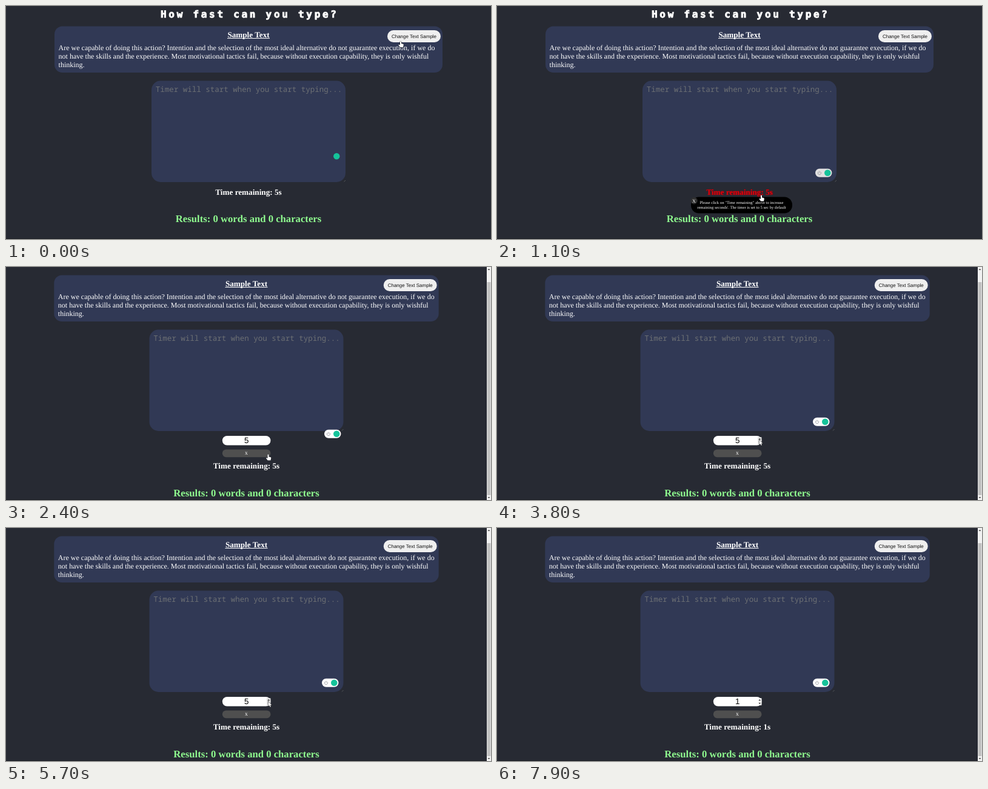
These frames come from a looping animation (800 by 385 pixels, 8000 ms). An HTML page with a canvas:

```html
<!DOCTYPE html>
<html lang="en">
<head>
<meta charset="utf-8">
<title>How fast can you type?</title>
<style>
html, body { margin: 0; width: 100%; height: 100%; overflow: hidden; background: #272a33; }
canvas { display: block; }
</style>
</head>
<body>
<canvas id="stage" width="800" height="385"></canvas>
<script>
const ctx = document.getElementById('stage').getContext('2d');
const LOOP = 8000;
const SETTINGS_AT = 2400;
const BG = '#272a33', PANEL = '#313955', MINT = '#15c39a';
const SERIF = '"Liberation Serif", "Times New Roman", serif';
const SANS = '"Liberation Sans", Arial, sans-serif';
const MONO = '"Noto Sans Mono", "DejaVu Sans Mono", monospace';
const TITLE = 'bold 16px "DejaVu Sans Mono", monospace';

const SAMPLE = [
  'Are we capable of doing this action? Intention and the selection of the most ideal alternative do not guarantee execution, if we do',
  'not have the skills and the experience. Most motivational tactics fail, because without execution capability, they is only wishful',
  'thinking.'
];
const HINT = [
  'Please click on "Time remaining" above to increase',
  "remaining seconds'. The timer is set to 5 sec by default"
];

// [time, x, y] of the pointer tip
const MOVES = [
  [0, 651, 58], [100, 651, 58], [900, 436, 312.5], [1700, 436, 312.5],
  [2000, 432.5, 309.5], [2450, 432.5, 309.5], [2800, 432.5, 285.5],
  [4600, 432.5, 285.5], [4750, 432.5, 286.5], [LOOP, 432.5, 286.5]
];
// [time, seconds]
const CLICKS = [
  [0, 5], [4100, 6], [4300, 7], [4500, 8], [4800, 7], [5100, 6],
  [5700, 5], [5800, 4], [6100, 3], [6500, 2], [7100, 1]
];

const clamp = v => Math.max(0, Math.min(1, v));
const ease = v => v * v * (3 - 2 * v);

function pointerAt(t) {
  const i = MOVES.findIndex(m => m[0] > t);
  const a = MOVES[i - 1], b = MOVES[i];
  const k = ease((t - a[0]) / (b[0] - a[0]));
  return [a[1] + (b[1] - a[1]) * k, a[2] + (b[2] - a[2]) * k];
}

function secondsAt(t) {
  return CLICKS.filter(c => c[0] <= t).pop()[1];
}

function box(x, y, w, h, r, color) {
  ctx.fillStyle = color;
  ctx.beginPath();
  ctx.roundRect(x, y, w, h, r);
  ctx.fill();
}

function disc(x, y, r, color) {
  ctx.fillStyle = color;
  ctx.beginPath();
  ctx.arc(x, y, r, 0, 7);
  ctx.fill();
}

function text(s, x, y, font, color, align = 'center') {
  ctx.font = font;
  ctx.fillStyle = color;
  ctx.textAlign = align;
  ctx.fillText(s, x, y);
}

function title(mid, y) {
  const s = 'How fast can you type?', cell = 13.35;
  ctx.strokeStyle = '#fff';
  ctx.lineWidth = 0.9;
  [...s].forEach((c, i) => {
    const x = mid + (i - (s.length - 1) / 2) * cell;
    text(c, x, y, TITLE, '#fff');
    ctx.strokeText(c, x, y);
  });
}

function samplePanel(mid, width, dy) {
  const left = mid - width / 2, right = mid + width / 2;
  box(left, 33.5 + dy, width, 76.5, 13, PANEL);
  text('Sample Text', mid, 52 + dy, 'bold 13.2px ' + SERIF, '#fff');
  ctx.fillRect(mid - 35, 53 + dy, 70, 1);
  SAMPLE.forEach((s, i) =>
    text(s, left + 6.6, 73 + dy + i * 13.8, '12px ' + SERIF, '#fff', 'left'));
  box(right - 91, 40 + dy, 88, 20, 10, '#efefef');
  text('Change Text Sample', right - 47, 52.7 + dy, '8px ' + SANS, '#111');
}

function typingArea(mid, dy) {
  const left = mid - 160;
  box(left, 123.5 + dy, 320, 167.5, 15, PANEL);
  text('Timer will start when you start typing...', left + 6.8, 142.3 + dy,
    '12.5px ' + MONO, '#6d7074', 'left');
  ctx.strokeStyle = '#777';
  ctx.lineWidth = 0.6;
  ctx.beginPath();
  ctx.moveTo(left + 317.5, 290.5 + dy);
  ctx.lineTo(left + 320, 288 + dy);
  ctx.stroke();
}

function helperPill(x, y, shade) {
  box(x, y, 27.5, 14, 7, shade);
  disc(x + 20.3, y + 7, 5.3, MINT);
  ctx.strokeStyle = '#8b8d94';
  ctx.lineWidth = 0.8;
  ctx.beginPath();
  ctx.arc(x + 7, y + 7.2, 2.6, -1, 4.14);
  ctx.moveTo(x + 7, y + 4);
  ctx.lineTo(x + 7, y + 6.8);
  ctx.stroke();
}

function footer(mid, timeY, resultY, seconds, hot) {
  ctx.save();
  if (hot) {
    ctx.shadowColor = '#a00008';
    ctx.shadowBlur = 1.5;
    ctx.shadowOffsetX = 0.6;
  }
  text(`Time remaining: ${seconds}s`, mid, timeY, 'bold 13.2px ' + SERIF,
    hot ? '#dc000c' : '#fff');
  ctx.restore();
  text('Results: 0 words and 0 characters', mid, resultY,
    'bold 16.68px ' + SERIF, '#8ffa8f');
}

function tooltip() {
  box(320, 315.5, 167, 27, 13, '#000');
  HINT.forEach((s, i) =>
    text(s, 403.4, 327.4 + i * 7.7, '6.7px ' + SERIF, '#fff'));
  disc(325, 321.8, 5.7, '#303030');
  text('X', 325, 324.6, '8px ' + SERIF, '#fff');
}

function spinner(active) {
  box(430, 281, 6.5, 12, 1, active ? '#dedede' : '#fff');
  [[285.2, -1], [288.8, 1]].forEach(([y, dir]) => {
    ctx.fillStyle = '#333';
    ctx.beginPath();
    ctx.moveTo(431.3, y);
    ctx.lineTo(435.3, y);
    ctx.lineTo(433.3, y + dir * 2.2);
    ctx.fill();
  });
}

function timerSettings(seconds, t) {
  box(356.8, 279, 79.7, 15.5, 7.75, '#fff');
  text(seconds, 396.6, 291.4, '13.33px ' + SANS, '#000');
  if (t >= 2800) spinner(t < 7600);
  box(356.8, 301.5, 79.7, 12.7, 6.3, '#4f4f4f');
  text('x', 396.5, 310, '9.6px ' + SERIF, '#fff');
}

function scrollbar() {
  ctx.fillStyle = '#f1f1f1';
  ctx.fillRect(793, 0, 7, 385);
  ctx.fillStyle = '#c1c1c1';
  ctx.fillRect(793.6, 25, 5.8, 352);
  [[5, -1], [380, 1]].forEach(([y, dir]) => {
    ctx.fillStyle = '#505050';
    ctx.beginPath();
    ctx.moveTo(794.5, y);
    ctx.lineTo(798.5, y);
    ctx.lineTo(796.5, y + dir * 2.2);
    ctx.fill();
  });
}

const HAND = new Path2D('M-1 .8Q0-.6 1 .8V4L4 4.7Q5 5 4.8 6.5L4 10H-.8L-3.6 6.4Q-3.4 5-1 6.5Z');
const ARROW = new Path2D('M0 0V8L1.9 6.4 3.2 9.3 4.5 8.7 3.2 5.9H5.8Z');

function pointer(x, y, shape) {
  ctx.save();
  ctx.translate(x, y);
  ctx.strokeStyle = '#15161a';
  ctx.lineWidth = 1;
  ctx.lineJoin = 'round';
  ctx.stroke(shape);
  ctx.fillStyle = '#fff';
  ctx.fill(shape);
  ctx.restore();
}

function mainView(t) {
  const hot = t >= 850;
  title(400, 19);
  samplePanel(400, 640, 0);
  typingArea(400, 0);
  if (t < 500) {
    disc(545.3, 248.3, 5.2, MINT);
  } else {
    const v = Math.round(224 + 31 * clamp((t - 1100) / 300));
    helperPill(525, 268.8, `rgb(${v},${v},${v})`);
  }
  footer(400, 311.5, 357, 5, hot);
  if (hot) tooltip();
}

function settingsView(t) {
  const seconds = secondsAt(t);
  samplePanel(396.5, 634.5, -20);
  typingArea(396.5, -20);
  if (t < 2600) helperPill(525, 268.8, '#fff');
  else helperPill(521, 248.8, '#fff');
  timerSettings(seconds, t);
  footer(396.5, 333, 378.5, seconds, false);
  scrollbar();
}

function draw(t) {
  ctx.fillStyle = BG;
  ctx.fillRect(0, 0, 800, 385);
  ctx.fillStyle = '#1c1e24';
  ctx.fillRect(0, 384, 800, 1);
  (t < SETTINGS_AT ? mainView : settingsView)(t);
  if (t < 7600) {
    const [x, y] = pointerAt(t);
    const overLink = y < 61 || y > 300;
    pointer(x, y, overLink ? HAND : ARROW);
  }
}

ctx.textRendering = 'geometricPrecision';
const start = performance.now();
function tick() {
  draw((performance.now() - start) % LOOP);
  requestAnimationFrame(tick);
}
tick();
</script>
</body>
</html>
```
